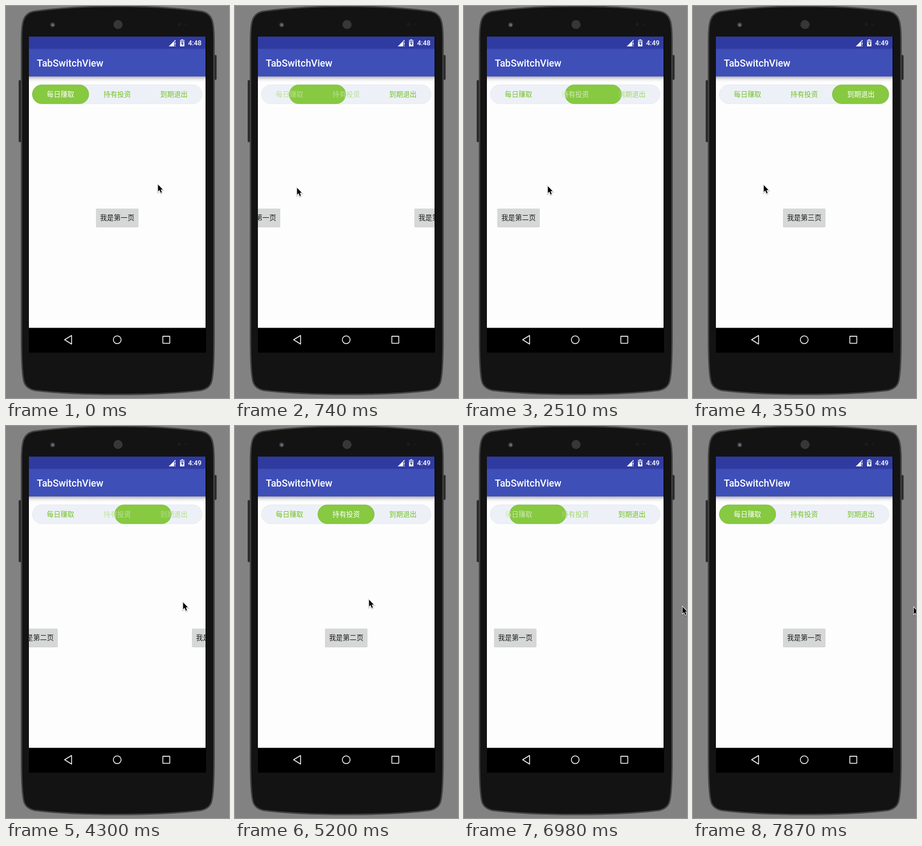
These frames come from a looping animation (409 px wide and 718 px high, 8 s). An HTML page:

```html
<!DOCTYPE html>
<html lang="zh">
<head>
<meta charset="utf-8">
<style>
html, body { margin: 0; width: 100%; height: 100%; overflow: hidden; background: #828282; }
svg { display: block; }
.latin { font-family: Roboto, sans-serif; font-weight: 500; fill: #fff; }
.cjk { font: 12.6px "Noto Sans CJK SC", "Noto Sans CJK", sans-serif; text-anchor: middle; }
</style>
</head>
<body>
<svg width="409" height="718" viewBox="0 0 409 718">
  <defs>
    <linearGradient id="shade" x2="0" y2="1">
      <stop stop-color="#adadb1"/>
      <stop offset=".3" stop-color="#d2d2d4"/>
      <stop offset=".6" stop-color="#eee"/>
      <stop offset="1" stop-color="#fdfdfd"/>
    </linearGradient>
    <pattern id="mesh" width="3" height="3" patternUnits="userSpaceOnUse">
      <rect width="3" height="3" fill="#1c1c1c"/>
      <circle cx=".8" cy=".8" r=".8" fill="#666"/>
      <circle cx="2.3" cy="2.3" r=".8" fill="#585858"/>
    </pattern>
    <clipPath id="screen"><rect x="42" y="56" width="324" height="533.5"/></clipPath>
    <path id="arrow" d="M.8 1V13.800L3.600 11.100L5.900 16.200L7.900 15.300L5.700 10.300H9.600Z"/>
  </defs>

  <!-- phone -->
  <rect width="409" height="718" fill="#828282"/>
  <rect x="23.5" y="136" width="6" height="113" rx="1.5" fill="#292929" stroke="#404040" stroke-width=".8"/>
  <rect x="380" y="90" width="6" height="45" rx="1.5" fill="#292929" stroke="#404040" stroke-width=".8"/>
  <path d="M28.5 62C28.5 28 32 14 50 10C100 3 150 .5 205 .5S310 3 360 10C378 14 381.5 28 381.5 62V610C381.5 660 380 682 376 691C373 698 367 702 358 704C310 710 260 711.5 205 711.5S100 710 52 704C43 702 37 698 34 691C30 682 28.500 660 28.500 610Z"
        fill="#131313" stroke="#424242" stroke-width="2.600"/>
  <circle cx="85.500" cy="34.500" r="4.500" fill="#33353a"/>
  <circle cx="85.500" cy="34.500" r="2.800" fill="#595d6b"/>
  <circle cx="86.500" cy="35.500" r="1.100" fill="#8e93a3"/>
  <circle cx="205.500" cy="34" r="8.300" fill="url(#mesh)"/>
  <circle cx="318" cy="33.500" r="3" fill="#1d1c1c"/>
  <circle cx="330" cy="33.500" r="1.800" fill="#1d1c1c"/>

  <!-- app -->
  <rect x="42" y="56" width="325" height="579"/>
  <rect x="42" y="56" width="324" height="533.500" fill="#fdfdfd"/>
  <rect x="42" y="129" width="324" height="10" fill="url(#shade)"/>
  <rect x="42" y="78" width="324" height="51" fill="#3e4fb8"/>
  <rect x="42" y="56" width="324" height="22.500" fill="#303ba1"/>
  <path d="M298.500 74L310.800 61.700V65H308.500V74Z" fill="#fff"/>
  <path d="M309.700 66.500h1.300v4.500h-1.300zM309.700 72.500h1.300v1.500h-1.300z" fill="#fff"/>
  <path d="M321.700 61h2.800v1.300h2.700V74h-8V62.300h2.500z" fill="#fff"/>
  <path d="M319.200 62.300h8v4h-8z" fill="#9ba1d3"/>
  <path d="M323.800 64.500L321 69.300h1.900V73L325.800 68h-2z" fill="#303ba1"/>
  <text id="clock" class="latin" x="334" y="72.300" font-size="12.500"></text>
  <text class="latin" x="56.500" y="110.600" font-size="17.900">TabSwitchView</text>

  <g clip-path="url(#screen)"><g id="pages"></g></g>

  <rect x="48.500" y="144.500" width="311" height="34.500" rx="17.250" fill="#edf1f7" stroke="#e4e9f0"/>
  <rect id="pill" x="48.400" y="144.400" width="103.400" height="34.600" rx="17.300" fill="#87c941" stroke="#78b739" stroke-width=".8"/>
  <g id="tabs"></g>

  <g fill="none" stroke="#ededed" stroke-width="1.600">
    <path d="M107.500 611.300L120.300 603.500V619.200Z" stroke-linejoin="round"/>
    <circle cx="204" cy="611.300" r="7.100"/>
    <rect x="287.600" y="604.900" width="12.800" height="12.800" rx=".5"/>
  </g>

  <g id="cursor">
    <use href="#arrow" y="1" fill="none" stroke="#000" stroke-opacity=".2" stroke-width="3"/>
    <use href="#arrow" stroke="#fff" stroke-width="1.800" paint-order="stroke"/>
  </g>
</svg>
<script>
const LOOP = 8000, LAST_STEP = 53;
const PAGE_W = 324, TAB_W = 103.6, SLOP = 5, WINDOW_EDGE = 396, SETTLE = 2;
const LABELS = ["每日赚取", "持有投资", "到期退出"];
const GREEN = [115, 193, 36];

// Points on the mouse path: step, x, y
const PATH = [
  [0, 278, 326], [5, 113, 332], [10, 2, 330], [15, 262, 328], [17, 153, 329],
  [21, 39, 328], [24, 129, 327], [29, 324, 322], [32, 369, 320], [37, 177, 316],
  [42, 323, 315], [46, 399, 330], [LAST_STEP, 404, 331]
];
const DRAGS = [
  { press: 0, release: 7, from: 0, to: 1 },
  { press: 15, release: 20, from: 1, to: 2 },
  { press: 24.4, release: 32, from: 2, to: 1 },
  { press: 37, release: 49, from: 1, to: 0 }
];

const $ = id => document.getElementById(id);
const clamp = (v, lo, hi) => Math.min(hi, Math.max(lo, v));

function add(parent, tag, attrs, text = "") {
  const el = document.createElementNS("http://www.w3.org/2000/svg", tag);
  for (const k in attrs) el.setAttribute(k, attrs[k]);
  el.textContent = text;
  return parent.appendChild(el);
}

const rate = (i, k) => (PATH[i + 1][k] - PATH[i][k]) / (PATH[i + 1][0] - PATH[i][0]);

// Slope at a point: flat at turns and ends, harmonic mean elsewhere
function slope(i, k) {
  if (i === 0 || i === PATH.length - 1) return 0;
  const a = rate(i - 1, k), b = rate(i, k);
  return a * b > 0 ? 2 * a * b / (a + b) : 0;
}

// Mouse coordinate (k = 1 for x, 2 for y) on a monotone cubic
function mouse(step, k) {
  let i = 0;
  while (i < PATH.length - 2 && PATH[i + 1][0] < step) i++;
  const a = PATH[i], b = PATH[i + 1], h = b[0] - a[0];
  const u = (step - a[0]) / h, v = 1 - u;
  return v * v * (1 + 2 * u) * a[k] + u * u * (1 + 2 * v) * b[k]
    + h * u * v * (v * slope(i, k) - u * slope(i + 1, k));
}

// The pager follows the mouse while held, then eases to its page
function pager(step) {
  const drag = DRAGS.findLast(d => d.press <= step);
  const x = Math.min(WINDOW_EDGE, mouse(Math.min(step, drag.release), 1));
  const moved = x - mouse(drag.press, 1);
  const past = Math.sign(moved) * Math.max(0, Math.abs(moved) - SLOP);
  const held = drag.from - past / PAGE_W;
  const u = clamp((step - drag.release) / SETTLE, 0, 1);
  return held + (drag.to - held) * (1 - (1 - u) ** 3);
}

const tabs = LABELS.map((label, i) => {
  const dx = i * PAGE_W;
  add($("pages"), "rect", { x: 165 + dx, y: 371.5, width: 78, height: 33.7, rx: 2, fill: "#c6c7c7" });
  add($("pages"), "rect", { x: 165 + dx, y: 371, width: 78, height: 33.5, rx: 2, fill: "#d6d7d7" });
  add($("pages"), "text", { class: "cjk", x: 204 + dx, y: 392, fill: "#1c1c1c" }, "我是第" + "一二三"[i] + "页");
  return add($("tabs"), "text", { class: "cjk", x: 100 + i * 104, y: 166.2 }, label);
});

// The picture advances in holds of about 148 ms
function stepAt(t) {
  const s = t < 3550 ? t / 147.5 : 24 + (t - 3550) / 148.9;
  return Math.min(LAST_STEP, Math.floor(s));
}

const move = (id, x, y = 0) => $(id).setAttribute("transform", `translate(${x} ${y})`);

function draw(now) {
  const step = stepAt(now % LOOP);
  const p = pager(step);
  move("cursor", Math.round(mouse(step, 1)), Math.round(mouse(step, 2)));
  move("pages", -Math.round(p * PAGE_W));
  move("pill", p * TAB_W);
  tabs.forEach((tab, i) => {
    const w = Math.max(0, 1 - Math.abs(p - i));
    tab.setAttribute("fill", `rgb(${GREEN.map(c => Math.round(c + (255 - c) * w))})`);
  });
  $("clock").textContent = step < 12 ? "4:48" : "4:49";
}

function loop() {
  draw(performance.now());
  requestAnimationFrame(loop);
}
loop();
</script>
</body>
</html>
```
